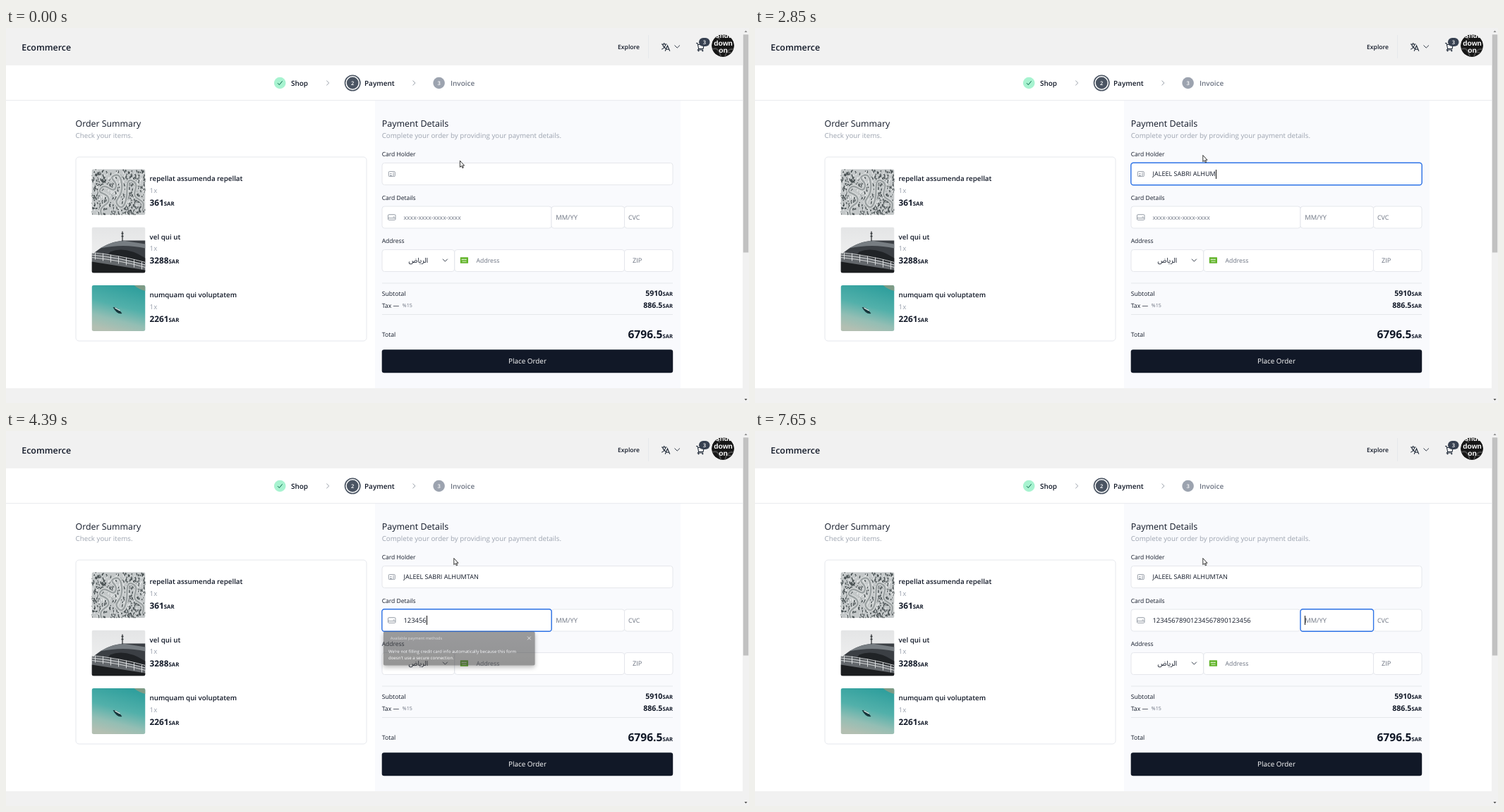
An HTML page that plays this animation: 1053x532 px, repeating every 8000 ms.

```html
<!DOCTYPE html>
<html lang="en">
<head>
<meta charset="utf-8">
<title>Checkout</title>
<style>
html, body { margin: 0; width: 100%; height: 100%; overflow: hidden; background: #fff; }
svg { display: block; }
text { font-family: "Open Sans", "Noto Sans", sans-serif; fill: #111827; white-space: pre; text-rendering: geometricPrecision; }
.b { font-weight: 600; }
.h { font-weight: 700; }
.g { fill: #9ca3af; }
.p { fill: #6b7280; }
.w { fill: #fff; }
.e { text-anchor: end; }
.m { text-anchor: middle; }
.box { fill: #fff; stroke: #e2e5ea; stroke-width: .9; }
.line { fill: none; stroke: #e5e7eb; }
.ico { fill: none; stroke: #8b929e; stroke-width: .9; }
.dark { fill: none; stroke: #1f2937; stroke-width: 1.1; }
.ring { fill: none; stroke: #2f74e8; stroke-width: 1.4; }
#popup { filter: drop-shadow(0 3px 3px #0007); }
</style>
</head>
<body>
<svg width="1053" height="532" viewBox="0 0 1053 532">
<defs>
  <clipPath id="face"><circle cx="1016" cy="25" r="16"/></clipPath>
  <clipPath id="thumb"><rect width="76" height="65" rx="3"/></clipPath>
  <linearGradient id="sea" x1=".65" y1="0" x2=".35" y2="1">
    <stop offset="0" stop-color="#2f9f9d"/><stop offset=".45" stop-color="#52b0aa"/>
    <stop offset=".75" stop-color="#93beb4"/><stop offset="1" stop-color="#b3bfb2"/>
  </linearGradient>
  <linearGradient id="sky" x2="0" y2="1"><stop stop-color="#e4e5e6"/><stop offset="1" stop-color="#f4f4f4"/></linearGradient>
  <linearGradient id="tip" x2="0" y2="1"><stop stop-color="#4f4f4f"/><stop offset="1" stop-color="#404040"/></linearGradient>
  <path id="road" fill="none" d="M14 65C8 50 26 52 24 42S6 36 13 27S30 36 34 26S22 14 32 9S44 22 42 32S30 44 38 52S50 42 50 30S52 12 60 18S56 34 63 40S76 44 72 58"/>
</defs>

<!-- page areas -->
<rect width="1053" height="532" fill="#fff"/>
<path d="M0 0H1044V53H0zM0 511H1044V532H0zM1044 0H1053V532H1044z" fill="#f1f1f1"/>
<rect x="523" y="103" width="433" height="408" fill="#f9fafd"/>
<path class="line" d="M0 102.7H1044M910.5 10V43" stroke-width=".9"/>
<rect x="1044.8" y="9.3" width="7.4" height="309.2" fill="#c1c1c1"/>
<path d="M1046.5 6L1048.5 3.5L1050.5 6z" fill="#8a8a8a"/><path d="M1046.5 526L1048.5 528.5L1050.5 526z" fill="#505050"/>

<!-- header -->
<text class="b" x="22.3" y="31.5" font-size="12.4">Ecommerce</text>
<text class="b" x="867" y="30.2" font-size="8.6">Explore</text>
<path class="dark" d="M929 23H936.5M932.7 21V23M930.5 23Q932 28 936 29.5M935 23Q934 28 929.3 30.3M934.2 32.8L937.5 25L940.8 32.8M935.3 30.2H939.7"/>
<path class="dark" d="M947.5 24.5L951.2 28.2L955 24.5" style="stroke-width:.9"/>
<path class="dark" d="M978 21.5H980L981.7 29.5H988L989.3 23.5H980.5M981.7 29.5L980.4 31H988"/>
<circle cx="981.5" cy="32.3" r="1.1" fill="#1f2937"/><circle cx="987.3" cy="32.3" r="1.1" fill="#1f2937"/>
<rect x="982" y="14" width="15.5" height="12" rx="6" fill="#374151"/>
<text class="b w m" x="989.8" y="22.8" font-size="7.5">3</text>
<g clip-path="url(#face)">
  <circle cx="1016" cy="25" r="16" fill="#161616"/>
  <path d="M1000 31Q1010 25 1013 41M1019 41Q1022 27 1033 31M1003 10L1012 16M1022 34L1031 36" fill="none" stroke="#4a4a4a" stroke-width="2"/>
  <g font-size="10.2" style="font-family:'Liberation Sans',sans-serif">
    <text class="h w m" style="font-family:inherit" x="1016.5" y="14.3">shut</text>
    <text class="h w m" style="font-family:inherit" x="1016.5" y="24.6">down</text>
    <text class="h w m" style="font-family:inherit" x="1016.5" y="34.6">on</text>
  </g>
</g>

<!-- steps -->
<circle cx="388.2" cy="78" r="8.3" fill="#a7f3d0"/>
<path d="M385 78.2L387.3 80.6L391.6 75.4" fill="none" stroke="#065f46"/>
<circle cx="491.2" cy="78" r="10.7" fill="#fff" stroke="#4b5563" stroke-width="1.6"/>
<circle cx="491.2" cy="78" r="8.4" fill="#4b5563"/>
<circle cx="613.6" cy="78" r="8.3" fill="#9ca3af"/>
<g class="ico"><path d="M454.3 74.7L457.7 78L454.3 81.3M576.5 74.7L579.9 78L576.5 81.3"/></g>
<g font-size="7.6"><text class="b w m" x="491.2" y="80.8">2</text><text class="b w m" x="613.6" y="80.8">3</text></g>
<g font-size="9.95">
  <text class="b" x="404" y="81.8">Shop</text><text class="b" x="508" y="81.8">Payment</text>
  <text class="b" x="630" y="81.8" style="fill:#6b7280">Invoice</text>
</g>

<!-- order summary -->
<text x="98.6" y="139.5" font-size="12.35">Order Summary</text>
<text class="g" x="98.6" y="156.4" font-size="9.75">Check your items.</text>
<rect class="box" x="99" y="183" width="412" height="261" rx="4.5"/>
<g transform="translate(121.5 200.3)" clip-path="url(#thumb)">
  <rect width="76" height="65" fill="#c3c7c8"/>
  <path id="trees" fill="none" stroke="#485052" stroke-width="1.4"/>
  <path id="snow" fill="none" stroke="#eef0f0"/>
  <use href="#road" stroke="#d9dcdc" stroke-width="5"/>
  <use href="#road" stroke="#9ba1a2" stroke-width="2.4"/>
</g>
<g transform="translate(121.5 282.5)" clip-path="url(#thumb)">
  <rect width="76" height="65" fill="url(#sky)"/>
  <path d="M4 36Q20 22 44 19H76V56L0 42z" fill="#3b3f44"/>
  <path d="M12 30Q26 21 44 19L76 24V30Q45 23 12 30z" fill="#777d82"/>
  <path d="M26 35Q48 26 76 44V51L22 41z" fill="#202326"/>
  <path d="M0 37L36 42L76 53V65H0z" fill="#63676b"/>
  <path d="M0 49L76 61V65H0z" fill="#1c1e20"/>
  <path d="M0 36Q40 40 76 50M0 39.5Q40 43.5 76 53.5M0 43Q40 47 76 57M5 36V46M16 37V48M27 39V50M38 41V52M49 43V54M60 46V57M71 49V60" fill="none" stroke="#e3e5e6" stroke-width=".9"/>
  <path d="M43.5 6V20M42 9H45M42 13H45" stroke="#33373a" stroke-width="1.3"/>
</g>
<g transform="translate(121.5 365)" clip-path="url(#thumb)">
  <rect width="76" height="65" fill="url(#sea)"/>
  <path d="M60 0H76V8Q67 6 60 0z" fill="#7e9b86"/>
  <path d="M30 31Q37 31 43 40Q36 42 30 31z" fill="#17363b"/><path d="M33 32L40 36" stroke="#eef4f2" stroke-width="1.3"/>
</g>
<g id="items"></g>

<!-- payment details -->
<text x="532.7" y="139.5" font-size="12.5">Payment Details</text>
<text class="g" x="532.7" y="156.4" font-size="9.75">Complete your order by providing your payment details.</text>
<g font-size="8.5"><text x="532.7" y="182">Card Holder</text><text x="532.7" y="243.5">Card Details</text><text x="532.7" y="305">Address</text></g>
<g class="box">
  <rect x="533" y="191.5" width="412" height="31" rx="3.5"/>
  <rect x="533" y="253" width="240" height="31" rx="3.5"/><rect x="773" y="253" width="103.5" height="31" rx="3.5"/><rect x="876.5" y="253" width="68.5" height="31" rx="3.5"/>
  <rect x="533" y="314.5" width="102.5" height="31" rx="3.5"/><rect x="635.8" y="314.5" width="240.7" height="31" rx="3.5"/><rect x="876.5" y="314.5" width="68.5" height="31" rx="3.5"/>
</g>
<g class="ico">
  <rect x="542.3" y="203.6" width="9" height="7" rx="1"/><path d="M544 209.2H546.8M548 206H550M548 208.5H550M544.4 206.5H546.4" stroke-width="1.2"/>
  <rect x="541.5" y="264.7" width="10.5" height="7.6" rx="1.2"/><path d="M541.5 269.7H552M548.6 268H550.4"/>
</g>
<text class="m" x="584.3" y="333" font-size="9.9" style="font-family:'Noto Sans Arabic','DejaVu Sans',sans-serif">الرياض</text>
<path d="M619 327.7L622.4 331.2L625.8 327.7" class="dark" style="stroke-width:.9"/>
<rect x="643.8" y="325.2" width="11.2" height="8.6" rx=".6" fill="#62b42a"/>
<path d="M645.8 328.5H653" stroke="#fff" stroke-width="1.5" stroke-dasharray="1.3 .5"/><path d="M646.5 331.4H652.5" stroke="#fff" stroke-width=".7"/>
<text class="p" x="666.6" y="333" font-size="8.7">Address</text>
<text class="p" x="888" y="333" font-size="9.2">ZIP</text>
<text class="p" x="779.3" y="271.6" font-size="9.3">MM/YY</text>
<text class="p" x="882" y="271.6" font-size="8.9">CVC</text>
<text class="p" id="hint" x="563.5" y="271.6" font-size="8.7">xxxx-xxxx-xxxx-xxxx</text>
<text id="name" x="563.5" y="210.3" font-size="9.1"></text>
<text id="card" x="563.5" y="271.6" font-size="9.37"></text>

<path class="line" d="M533 362H945M533 406.5H945"/>
<g font-size="8.7"><text x="532.7" y="380">Subtotal</text><text x="532.7" y="396.5">Tax —</text><text x="532.7" y="438">Total</text></g>
<text class="p" x="561.8" y="396.2" font-size="7.1">%15</text>
<g id="sums"></g>
<rect x="532.7" y="456.2" width="412.5" height="33" rx="3.3" fill="#111827"/>
<text class="w m" x="739" y="476.3" font-size="9.9">Place Order</text>

<!-- moving parts -->
<rect class="ring" id="ring" height="31.5" rx="3.5"/>
<rect id="caret" width="1" height="13" fill="#111"/>
<g id="popup">
  <rect x="532.5" y="284" width="219.5" height="49" rx="2" fill="url(#tip)"/>
  <text x="542.5" y="296" font-size="5.8" style="fill:#c4c4c4">Available payment methods</text>
  <path d="M741.2 291.2L746 296M746 291.2L741.2 296" stroke="#eee" stroke-width=".8"/>
  <g font-size="6.25"><text class="w" x="539.7" y="315.3">We're not filling credit card info automatically because this form</text><text class="w" x="539.7" y="324.2">doesn't use a secure connection.</text></g>
</g>
<path id="mouse" d="M0 0V9.2L2.1 7.3L3.5 10.4L4.9 9.8L3.5 6.8H6.2z" fill="#fff" stroke="#222" stroke-width=".9"/>
</svg>
<script>
const $ = id => document.getElementById(id);
const text = (cls, x, y, size, s) => `<text class="${cls}" x="${x}" y="${y}" font-size="${size}">${s}</text>`;

$('items').innerHTML = [
  ['repellat assumenda repellat', 361], ['vel qui ut', 3288], ['numquam qui voluptatem', 2261]
].map(([title, price], i) => {
  const y = 217.3 + i * 82.4;
  return text('b', 203.6, y, 9.75, title) + text('g', 203.6, y + 16.6, 9.75, '1x') +
    `<text class="h" x="203.6" y="${y + 34.7}" font-size="11.8">${price}<tspan font-size="7.8">SAR</tspan></text>`;
}).join('');

$('sums').innerHTML = [['5910', 380.3, 10.6], ['886.5', 396.8, 10.6], ['6796.5', 440.3, 15.6]]
  .map(([n, y, size]) => text('h e', 930.4, y, size, n) + text('h e', 945, y, 7.6, 'SAR')).join('');

// woodland speckle
let seed = 7;
const rnd = n => (seed = seed * 16807 % 2147483647) / 2147483647 * n;
const specks = n => Array.from({ length: n }, () =>
  `M${rnd(76).toFixed(1)} ${rnd(65).toFixed(1)}l${(rnd(3) - 1.5).toFixed(1)} ${(1 + rnd(3)).toFixed(1)}`).join('');
$('trees').setAttribute('d', specks(420));
$('snow').setAttribute('d', specks(160));

const LOOP = 8000;
const NAME = 'JALEEL SABRI ALHUMTAN', CARD = '12345678901234567890123456';
const nameKeys = [1030, 1120, 1170, 1260, 1310, 1400, 1540, 1680, 1770, 1820, 1960,
  2050, 2100, 2190, 2290, 2430, 2710, 2850, 2940, 2990, 3130];
const cardKeys = [3920, 4010, 4060, 4200, 4290, 4340, 4480, 4530, 4620, 4810, 4990, 5040, 5090,
  5270, 5320, 5410, 5550, 5690, 5690, 5970, 6110, 6160, 6210, 6390, 6490, 6490];
// focus: start, x, y, width, typed text
const fields = [
  { at: 290, x: 532.8, y: 191.2, w: 412.4, typed: 'name' },
  { at: 3500, x: 532.8, y: 252.7, w: 240.4, typed: 'card' },
  { at: 7610, x: 773, y: 252.7, w: 103.6 }
];

const clamp = v => Math.max(0, Math.min(1, v));
const ramp = (t, a, b) => clamp((t - a) / (b - a));
const ease = k => k * k * (3 - 2 * k);
const within = (t, a, b) => t >= a && t < b;
const set = (id, attrs) => { for (const k in attrs) $(id).setAttribute(k, attrs[k]); };
const type = (id, s, keys, t) => { $(id).textContent = s.slice(0, keys.filter(k => k <= t).length); };

function draw(t) {
  type('name', NAME, nameKeys, t);
  type('card', CARD, cardKeys, t);
  set('hint', { opacity: t < cardKeys[0] ? 1 : 0 });

  const f = fields.filter(f => f.at <= t).pop();
  set('ring', f ? { x: f.x, y: f.y, width: f.w, opacity: ramp(t, f.at - 20, f.at + 40) } : { opacity: 0 });
  const off = !f || within(t, 790, 1030) || within(t, 6860, 7230);
  set('caret', { opacity: off ? 0 : 1 });
  if (f) set('caret', {
    x: Math.round(f.typed ? 563.4 + $(f.typed).getComputedTextLength() : 779),
    y: Math.round(f.y + 9.3)
  });

  const show = ease(ramp(t, 3920, 4080)) * (1 - ramp(t, 4230, 4600));
  const s = 0.95 + 0.05 * show;
  set('popup', {
    opacity: 0.98 * show,
    transform: `translate(642.2 308.5) scale(${s}) translate(-642.2 -308.5)`
  });

  const k = ease(ramp(t, 30, 600));
  set('mouse', { transform: `translate(${643.4 - 8.6 * k} ${188.3 - 7.8 * k})` });
}

const start = performance.now();
function tick() {
  draw((performance.now() - start) % LOOP);
  requestAnimationFrame(tick);
}
tick();
</script>
</body>
</html>
```
